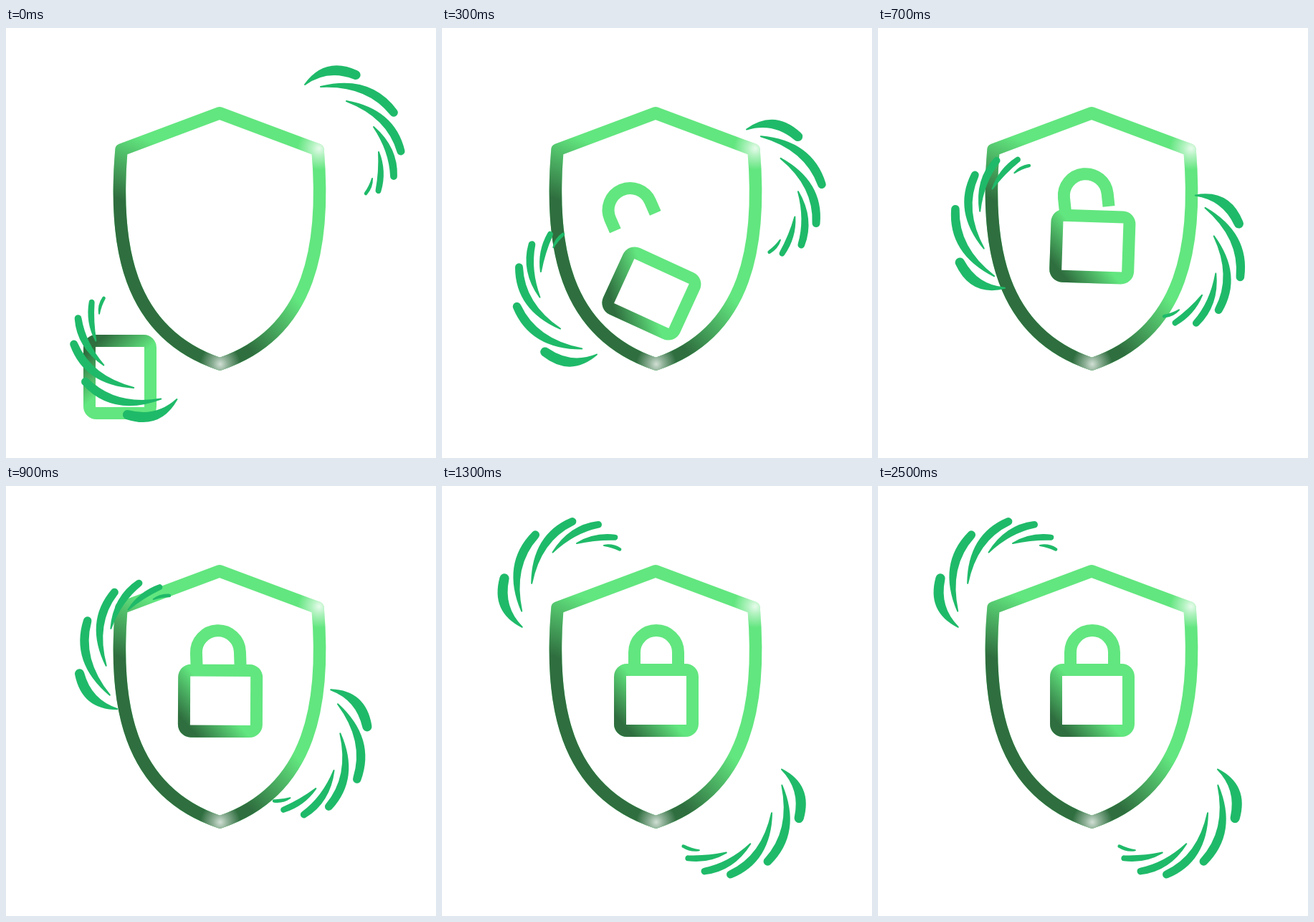
An HTML page with a canvas that plays this animation: 600 px wide and 600 px high, repeating every 2.6 s.

```html
<!DOCTYPE html>
<html lang="en">
<head>
<meta charset="utf-8">
<title>Shield and lock</title>
<style>
  html, body { margin: 0; width: 100%; height: 100%; overflow: hidden; background: #fff; }
  canvas { display: block; width: 600px; height: 600px; }
</style>
</head>
<body>
<canvas id="stage" width="600" height="600"></canvas>
<script>
const ctx = document.getElementById('stage').getContext('2d');
const LOOP = 2600, STEP = 100, MOVE = 1300;
const LIGHT = '#62e67f', LEAF = '#1fba69', RAD = Math.PI / 180;
const dark = a => `rgba(47,110,63,${a})`;
const white = a => `rgba(255,255,255,${a})`;
const mix = (a, b, k) => a + (b - a) * k;

// Tapered blades: tip, control point, thick end, end radius
const blades = [
  [417, 79, 447, 48, 488, 65.5, 5.6],
  [439, 82, 506, 72, 541, 118, 4.8],
  [475, 102, 537, 119, 551, 172, 4.5],
  [513, 138, 541, 169.5, 541, 207, 3.9],
  [520, 173, 526, 200, 519.5, 227, 3],
  [511, 210, 509.5, 221.5, 502, 231, 1.3]
];
const pivot = [476.2, 114.4];

const shield = new Path2D(
  'M298 118.7 L161 170 C150 300 168 425 298.5 469 C428 425 446 300 435 170 Z');
const shackle = new Path2D('M-30.5 18 V0 A30.5 30.5 0 0 1 30.5 0 V18');
const hook = new Path2D(
  'M227 329 C205 300 200 255 222 238 C236 226 250 227 258 227 Q261 228 261 235 ' +
  'L262 262 L250 281 L243 265 C244 252 236 249 229 253 C214 265 216 293 233 319 Z');

function linear(x0, y0, x1, y1, from, to) {
  const g = ctx.createLinearGradient(x0, y0, x1, y1);
  g.addColorStop(0, from);
  g.addColorStop(1, to);
  return g;
}

function glow(x, y, r, a) {
  const g = ctx.createRadialGradient(x, y, 0, x, y, r);
  g.addColorStop(0, white(a));
  g.addColorStop(0.35, white(a * 0.6));
  g.addColorStop(1, white(0));
  return g;
}

function strokeShield(style, x = 0, w = 600) {
  ctx.save();
  ctx.beginPath();
  ctx.rect(x, 0, w, 600);
  ctx.clip();
  ctx.strokeStyle = style;
  ctx.stroke(shield);
  ctx.restore();
}

function drawShield() {
  ctx.lineWidth = 17.5;
  ctx.lineJoin = 'round';
  strokeShield(LIGHT);
  strokeShield(linear(196, 155, 162, 240, dark(0), dark(1)), 0, 299);
  strokeShield(linear(412, 385, 340, 450, dark(0), dark(1)), 299, 301);
  strokeShield(glow(299, 469, 28, 0.78));
  strokeShield(glow(437, 168, 30, 0.85));
}

function drawShackle(t, left) {
  if (t < 200) return;
  if (t < 300) {
    ctx.fillStyle = LIGHT;
    ctx.fill(hook);
    return;
  }
  const slide = left ** 2.7;
  ctx.save();
  ctx.translate(299 - 74 * slide, 232 + 73 * left ** 4.56);
  ctx.rotate(-48 * slide * RAD);
  ctx.lineWidth = 17;
  ctx.strokeStyle = LIGHT;
  ctx.stroke(shackle);
  ctx.restore();
}

function drawBody(left) {
  const e = left ** 5, u = 1 - e;
  const curve = (a, b, c) => e * e * a + 2 * u * e * b + u * u * c;
  ctx.save();
  ctx.translate(curve(159, 308, 299), curve(487, 446, 299));
  ctx.rotate(92 * e * RAD - 2 * e * e * RAD);
  ctx.beginPath();
  ctx.roundRect(-59, -51, 118, 102, 18);
  ctx.fillStyle = LIGHT;
  ctx.fill();
  ctx.fillStyle = linear(-44, 36, -4, 0, dark(1), dark(0));
  ctx.fill();
  ctx.fillStyle = '#fff';
  ctx.fillRect(-42, -34, 84, 68);
  ctx.restore();
}

function drawBlade([x0, y0, cx, cy, x1, y1, r]) {
  const len = Math.hypot(x1 - x0, y1 - y0);
  const nx = (y1 - y0) / len * r * 1.5, ny = (x0 - x1) / len * r * 1.5;
  const end = Math.atan2(y1 - cy, x1 - cx), q = Math.PI / 2;
  ctx.beginPath();
  ctx.moveTo(x0, y0);
  ctx.quadraticCurveTo(cx + nx, cy + ny, x1 + r * Math.cos(end - q), y1 + r * Math.sin(end - q));
  ctx.arc(x1, y1, r, end - q, end + q);
  ctx.quadraticCurveTo(cx - nx, cy - ny, x0, y0);
  ctx.closePath();
  ctx.fill();
  ctx.stroke();
}

function drawSwirl(x, y, angle) {
  ctx.save();
  ctx.translate(x, y);
  ctx.rotate(angle * RAD);
  ctx.translate(-pivot[0], -pivot[1]);
  ctx.fillStyle = ctx.strokeStyle = LEAF;
  ctx.lineWidth = 2;
  blades.forEach(drawBlade);
  ctx.restore();
}

function draw(t) {
  const k = Math.min(t / MOVE, 1), left = 1 - k;
  ctx.fillStyle = '#fff';
  ctx.fillRect(0, 0, 600, 600);
  drawShield();
  drawShackle(t, left);
  drawBody(left);
  drawSwirl(mix(476.2, 448, k), mix(114.4, 459.3, k), mix(0, 81.2, k));
  drawSwirl(mix(175.6, 137.2, k), mix(489.7, 132.7, k), mix(173.4, 260.7, k));
}

function tick() {
  draw(Math.floor(performance.now() % LOOP / STEP) * STEP);
  requestAnimationFrame(tick);
}
tick();
</script>
</body>
</html>
```
